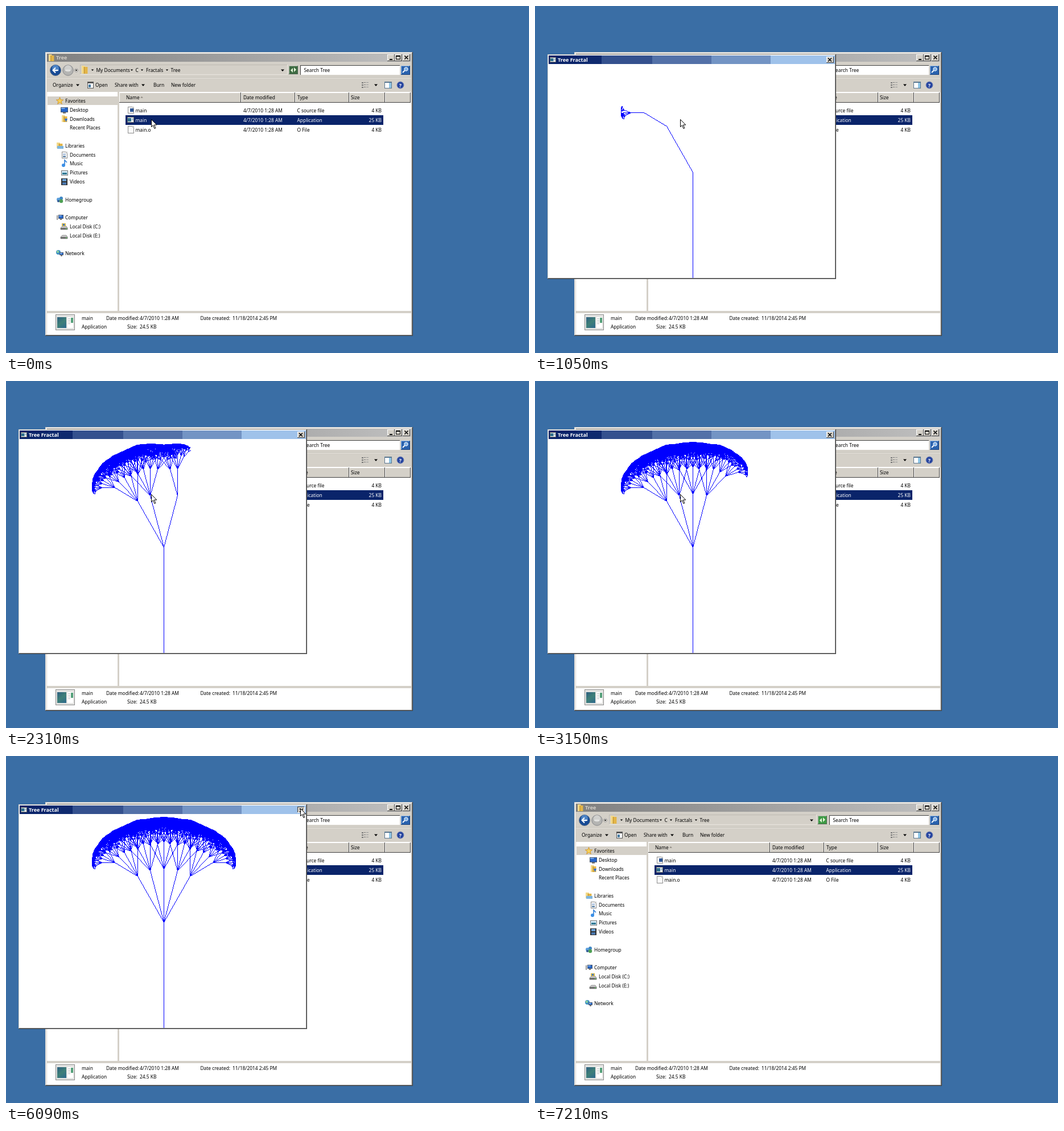
Animation, 919 px wide and 610 px high, one loop 7.28 s. Source, as an HTML page with a canvas:

```html
<!DOCTYPE html>
<html lang="en">
<head>
<meta charset="utf-8">
<title>Tree Fractal</title>
<style>
html, body { margin: 0; width: 100%; height: 100%; overflow: hidden; background: #3a6ea5; }
canvas { display: block; width: 919px; height: 610px; }
</style>
</head>
<body>
<canvas id="stage" width="919" height="610"></canvas>
<script>
const LOOP = 7280, STEP = 70;
const OPEN = 980, PRESS = 6090, CLOSE = 6230, BLUR = 7210;
const FACE = '#d4d0c8', SHADE = '#808080', DARK = '#404040', NAVY = '#0a246a';
const g = document.getElementById('stage').getContext('2d');

function box(x, y, w, h, c) { g.fillStyle = c; g.fillRect(x, y, w, h); }

function disc(x, y, r, c, rim) {
  g.beginPath();
  g.arc(x, y, r, 0, 7);
  g.fillStyle = c;
  g.fill();
  if (rim) { g.strokeStyle = rim; g.lineWidth = 1; g.stroke(); }
}

function poly(pts, fill, stroke, width = 1) {
  g.beginPath();
  pts.forEach(([x, y]) => g.lineTo(x, y));
  if (fill) { g.closePath(); g.fillStyle = fill; g.fill(); }
  if (stroke) { g.strokeStyle = stroke; g.lineWidth = width; g.stroke(); }
}

function text(s, x, y, c = '#000', align = 'left', bold = false, size = 8.4) {
  g.font = (bold ? 'bold ' : '') + size + 'px "Noto Sans", "Open Sans", sans-serif';
  g.textAlign = align;
  g.fillStyle = c;
  g.fillText(s, x, y);
}

function edges(x, y, w, h, light, dark) {
  box(x, y, w, 1, light);
  box(x, y, 1, h, light);
  box(x, y + h - 1, w, 1, dark);
  box(x + w - 1, y, 1, h, dark);
}

function frame(x, y, w, h) {
  box(x, y, w, h, FACE);
  edges(x, y, w, h, FACE, DARK);
  edges(x + 1, y + 1, w - 2, h - 2, '#fff', SHADE);
}

function button(x, y, w, h, down) {
  box(x, y, w, h, FACE);
  edges(x, y, w, h, down ? DARK : '#fff', down ? '#fff' : DARK);
}

function cross(x, y) {
  for (const d of [-1, 1]) poly([[x - 3 * d, y - 3], [x + 3 * d, y + 3]], null, '#000', 1.5);
}

function down(x, y, s = 3) { poly([[x - s, y - s / 2], [x + s, y - s / 2], [x, y + s / 2 + .5]], '#000'); }

function titleBar(x, y, w, h, active) {
  if (!active) {
    const grad = g.createLinearGradient(x, 0, x + w, 0);
    grad.addColorStop(0, '#808080');
    grad.addColorStop(1, '#c0c0c0');
    box(x, y, w, h, grad);
    return;
  }
  const cuts = [0, .185, .362, .568, .776, 1];
  const bands = ['#0f2a6f', '#34518e', '#5371a8', '#7394c4', '#9fc2ea'];
  bands.forEach((c, i) => {
    const a = x + Math.round(w * cuts[i]);
    box(a, y, x + Math.round(w * cuts[i + 1]) - a, h, c);
  });
  box(x, y, w * .1, h, NAVY);
}

function folder(x, y, w, h) {
  box(x + 1, y, w * .5, h, '#f3d98a');
  box(x + w * .4, y + 2, w * .55, h - 2, '#e3b548');
  box(x + w * .4, y + 2, 1, h - 2, '#b98a25');
}

function page(x, y, w, h) {
  box(x, y, w, h, '#8c8c8c');
  box(x + 1, y + 1, w - 2, h - 2, '#fbfbfb');
  box(x + w - 3, y, 3, 3, '#c8c8c8');
}

function appIcon(x, y, w, h) {
  box(x, y, w, h, '#666');
  box(x + 1, y + 1, w - 2, h - 2, '#f4f4f4');
  box(x + 1, y + 2, w * .5, h - 4, '#2f6f8c');
  box(x + w * .68, y + 2, w * .2, h * .4, '#9fb9cc');
}

function screen(x, y, w, h) {
  box(x, y, w, h, '#4a5a70');
  box(x + 1, y + 1, w - 2, h - 2, '#2464c8');
  box(x + 1, y + 1, w / 2, 2, '#73a8ee');
  box(x + w * .3, y + h, w * .4, 2, '#777');
}

function disk(x, y) {
  poly([[x, y + 3], [x + 3, y], [x + 10, y], [x + 12, y + 3], [x + 12, y + 6], [x, y + 6]], '#c9c9c9', '#777', .7);
  box(x, y + 3, 12, 3, '#6d6d6d');
  box(x + 9, y + 4, 2, 1, '#6f6');
}

function sideIcons() {
  const star = [];
  for (let i = 0; i < 10; i++) {
    const a = i * Math.PI / 5, r = i % 2 ? 2.8 : 6.5;
    star.push([94.5 + r * Math.sin(a), 167 - r * Math.cos(a)]);
  }
  poly(star, '#f6cf5a', '#c98a1c', .8);
  screen(96, 178, 13, 9);
  folder(97, 192, 11, 12);
  poly([[103, 198], [108, 198], [105.5, 204]], '#2a6cd0');
  folder(88, 240, 12, 10);
  box(90, 246, 11, 5, '#7db5e0');
  page(98, 256, 10, 12);
  box(100, 260, 5, 1, '#4a78b8');
  box(100, 263, 5, 3, '#6f8fae');
  poly([[103, 280], [103, 271], [107, 275]], null, '#2f7fd8', 1.6);
  disc(101, 280, 3, '#3b8fe6');
  box(97, 289, 12, 9, '#777');
  box(98, 290, 10, 7, '#d5ecfa');
  box(99, 293, 8, 3, '#2d7590');
  box(97, 303, 11, 12, '#333');
  box(99, 304, 7, 4, '#6aa2d8');
  box(99, 310, 7, 4, '#4a78b0');
  disc(92, 340, 3, '#5a9edc');
  disc(97, 338, 3, '#3f86c4');
  disc(97, 343, 3.2, '#4d9f55');
  disc(92, 343, 2, '#2c568f');
  screen(92, 367, 9, 7);
  box(89, 368, 2, 8, '#9a9a9a');
  disk(96, 387);
  box(98, 382, 7, 5, '#d8b84a');
  box(100, 383, 3, 3, '#3c78c8');
  disk(96, 403);
  disc(92, 433, 4, '#3d8fc4');
  disc(91, 432, 2, '#8fd39a');
  screen(94, 433, 7, 5);
}

function sidebar() {
  box(72, 151, 124, 385, '#fff');
  box(73, 159, 123, 15, FACE);
  const rows = [
    ['Favorites', 104, 170], ['Desktop', 112, 186], ['Downloads', 112, 201.5], ['Recent Places', 112, 217],
    ['Libraries', 104, 249], ['Documents', 112, 264.5], ['Music', 112, 280], ['Pictures', 112, 296],
    ['Videos', 112, 312], ['Homegroup', 104, 343.5], ['Computer', 104, 375],
    ['Local Disk (C:)', 112, 391], ['Local Disk (E:)', 112, 406.5], ['Network', 104, 438]
  ];
  rows.forEach(r => text(...r));
  sideIcons();
}

function navBar(fresh) {
  disc(87, 113, 9.5, '#174a94', '#5d6f88');
  disc(87, 109.5, 6, '#4d84c6');
  poly([[92, 113], [83, 113]], null, '#fff', 2.2);
  poly([[87, 108.5], [82.5, 113], [87, 117.5]], null, '#fff', 2);
  disc(109, 113, 9.2, '#b4b4b2', '#85868a');
  disc(109, 110, 6, '#d0d0ce');
  poly([[104, 113], [113, 113]], null, '#e6e6e4', 2);
  disc(123.5, 113, 3, '#dedbd4', '#999');
  down(123.5, 113, 1.8);
  edges(130, 103, 365, 18, '#bdb9b1', '#e9e6df');
  folder(132, 105, 12, 14);
  [152, 221, 239, 283].forEach(x => down(x, 112.5, 2.2));
  text('My Documents', 158.5, 115.5);
  text('C', 227.5, 115.5);
  text('Fractals', 246, 115.5);
  text('Tree', 289.5, 115.5);
  down(486, 113);
  box(497, 105, 16, 15, fresh ? '#3d9a45' : '#3d6b42');
  edges(497, 105, 16, 15, '#a9b7a5', '#4d6650');
  poly([[500, 113], [504, 109], [504, 117]], '#e4f4d8');
  poly([[510, 112], [506, 108], [506, 116]], '#e4f4d8');
  box(517, 104, 176, 18, '#fff');
  edges(517, 104, 176, 18, DARK, FACE);
  text('Search Tree', 523.5, 116);
  box(694, 105, 16, 16, '#2a62ae');
  edges(694, 105, 16, 16, '#88b2e4', '#173f7c');
  disc(703, 111, 3.2, '#82b4ea', '#fff');
  poly([[700.5, 113.5], [697, 117]], null, '#fff', 1.8);
}

function commandBar() {
  box(72, 125, 640, 1, '#c2beb6');
  box(72, 126, 640, 1, '#e8e5de');
  text('Organize', 82, 142);
  down(126, 139);
  box(143, 133, 11, 12, '#555');
  box(144, 136, 9, 8, '#fff');
  box(145, 138, 4, 5, '#467aa0');
  text('Open', 157, 142);
  text('Share with', 191, 142);
  down(241, 139);
  text('Burn', 259, 142);
  text('New folder', 290, 142);
  for (let i = 0; i < 3; i++) {
    box(625, 134 + i * 4, 3, 2, '#777');
    box(629, 134 + i * 4, 3, 1, '#777');
    box(633, 134 + i * 4, 4, 1, '#999');
  }
  down(650, 139);
  box(665, 133, 13, 12, '#5b7790');
  box(666, 135, 7, 9, '#fff');
  box(673, 135, 4, 9, '#8fc6e6');
  disc(693, 139, 6, '#2745a0', '#7182b2');
  text('?', 693, 142.5, '#fff', 'center', true, 9);
}

function fileList() {
  box(199, 151, 513, 385, '#fff');
  const cols = [[199, 413, 'Name', 211], [413, 508, 'Date modified', 417], [508, 603, 'Type', 512],
    [603, 666, 'Size', 606], [666, 711, '', 0]];
  for (const [a, b, label, x] of cols) {
    box(a, 152, b - a, 18, FACE);
    edges(a, 152, b - a, 18, '#fff', SHADE);
    box(b - 1, 152, 1, 18, DARK);
    box(a, 169, b - a, 1, DARK);
    text(label, x, 164);
  }
  poly([[236, 161.5], [238.5, 159], [241, 161.5]], '#8a867e');
  box(210, 192, 453, 17, NAVY);
  const files = [['main', 'C source file', '4 KB', 186.5], ['main', 'Application', '25 KB', 204], ['main.o', 'O File', '4 KB', 221]];
  files.forEach(([name, type, size, y], i) => {
    const c = i === 1 ? '#fff' : '#000';
    text(name, 227.5, y, c);
    text('4/7/2010 1:28 AM', 417, y, c);
    text(type, 511.5, y, c);
    text(size, 660, y, c, 'right');
  });
  page(214, 177, 11, 12);
  box(218, 180, 6, 6, '#2c5596');
  appIcon(213, 195, 12, 10);
  page(214, 211, 11, 13);
}

function details() {
  box(72, 536, 640, 4, FACE);
  box(72, 540, 640, 38, '#fff');
  box(87, 542, 34, 28, '#8a8a8a');
  box(88, 543, 32, 26, '#e4e4e2');
  const grad = g.createLinearGradient(90, 546, 106, 567);
  grad.addColorStop(0, '#2c5d82');
  grad.addColorStop(.5, '#3f8078');
  grad.addColorStop(1, '#2b6790');
  box(90, 547, 16, 19, grad);
  box(108, 547, 10, 19, '#fff');
  box(114, 548, 4, 9, '#54a07a');
  for (let y = 549; y < 560; y += 3) box(109, y, 4, 1, '#bbb');
  text('main', 133, 552);
  text('Application', 133, 566.5);
  text('Date modified:', 176, 552);
  text('4/7/2010 1:28 AM', 235, 552);
  text('Size:', 213, 566.5);
  text('24.5 KB', 235, 566.5);
  text('Date created:', 341.5, 552);
  text('11/18/2014 2:45 PM', 398, 552);
}

function explorer(active, fresh) {
  frame(69, 81, 646, 499);
  titleBar(72, 84, 640, 14, active);
  folder(74, 85, 11, 12);
  text('Tree', 88, 94, active ? '#fff' : FACE, 'left', true, 9);
  [670, 683, 697].forEach(x => button(x, 85, 13, 12));
  box(674, 93, 5, 2, '#000');
  g.strokeStyle = '#000';
  g.lineWidth = 1;
  g.strokeRect(685.5, 87.5, 7, 6);
  box(685, 87, 8, 2, '#000');
  cross(703.5, 90.5);
  navBar(fresh);
  commandBar();
  sidebar();
  box(196, 151, 3, 385, FACE);
  fileList();
  details();
}

// Branches in drawing order; x counts from the trunk, positions snap to whole pixels.
const TURNS = [30, 15, -15, 0, -30];
const branches = [];
function grow(x, y, len, angle, depth) {
  const a = angle * Math.PI / 180;
  const x2 = Math.trunc(x - len * Math.sin(a)), y2 = Math.floor(y - len * Math.cos(a));
  branches.push([x, y, x2, y2]);
  if (depth) TURNS.forEach(t => grow(x2, y2, len / 2, angle + t, depth - 1));
}
grow(0, 479, 187, 0, 6);

const paper = document.createElement('canvas');
paper.width = 503;
paper.height = 376;
const pen = paper.getContext('2d');
let drawn = 0;

function line([x1, y1, x2, y2]) {
  const n = Math.max(Math.abs(x2 - x1), Math.abs(y2 - y1));
  for (let i = 0; i < n; i++) {
    pen.fillRect(253 + Math.round(x1 + (x2 - x1) * i / n), Math.round(y1 + (y2 - y1) * i / n) - 102, 1, 1);
  }
}

function progress(t) {
  const keys = [[OPEN, 0], [1050, .0055], [2310, .476], [3150, .785], [3780, 1]];
  for (let i = 1; i < keys.length; i++) {
    const [a, p] = keys[i - 1], [b, q] = keys[i];
    if (t < b) return p + (q - p) * (t - a) / (b - a);
  }
  return 1;
}

function treeWindow(t) {
  const count = Math.round(progress(t) * branches.length);
  if (count < drawn) { pen.clearRect(0, 0, 503, 376); drawn = 0; }
  pen.fillStyle = '#00f';
  while (drawn < count) line(branches[drawn++]);

  frame(22, 85, 507, 395);
  titleBar(24, 87, 503, 15, true);
  appIcon(26, 90, 11, 9);
  text('Tree Fractal', 40, 97.5, '#fff', 'left', true, 9);
  const press = t >= PRESS ? 1 : 0;
  button(512, 89, 13, 11, press);
  cross(518 + press, 94.5 + press);
  box(24, 102, 503, 376, '#fff');
  g.drawImage(paper, 24, 102);
}

function glide(u, k) { return u + (u * u * (3 - 2 * u) - u) * k; }

function pointer(t) {
  const clamp = (a, d) => Math.min(1, Math.max(0, (t - a) / d));
  const u = clamp(4620, 770), v = glide(clamp(6160, 630), .3);
  if (t >= 6790) return;
  const x = Math.round(255 + 262 * glide(u, .35) + 303 * v) + .5;
  const y = Math.round(199 - 107 * glide(u, .8) + 548 * v) + .5;
  const shape = [[0, 0], [0, 13], [3, 10.2], [5.4, 16], [7.4, 15.2], [5, 9.5], [9.3, 9.5], [0, 0]];
  poly(shape.map(([a, b]) => [x + a, y + b]), '#fff', '#000');
}

let last = -1;
function tick(now) {
  const t = Math.floor(now % LOOP / STEP) * STEP;
  if (t !== last) {
    last = t;
    box(0, 0, 919, 610, '#3a6ea5');
    explorer(t >= CLOSE && t < BLUR, t >= CLOSE);
    if (t >= OPEN && t < CLOSE) treeWindow(t);
    pointer(t);
  }
  requestAnimationFrame(tick);
}
const start = performance.now();
const run = now => tick(Math.max(0, now));
requestAnimationFrame(function loop() {
  last = last < 0 ? -1 : last;
  run(0);
});
tick = (draw => () => draw(Math.max(0, performance.now() - start)))(tick);
</script>
</body>
</html>
```
